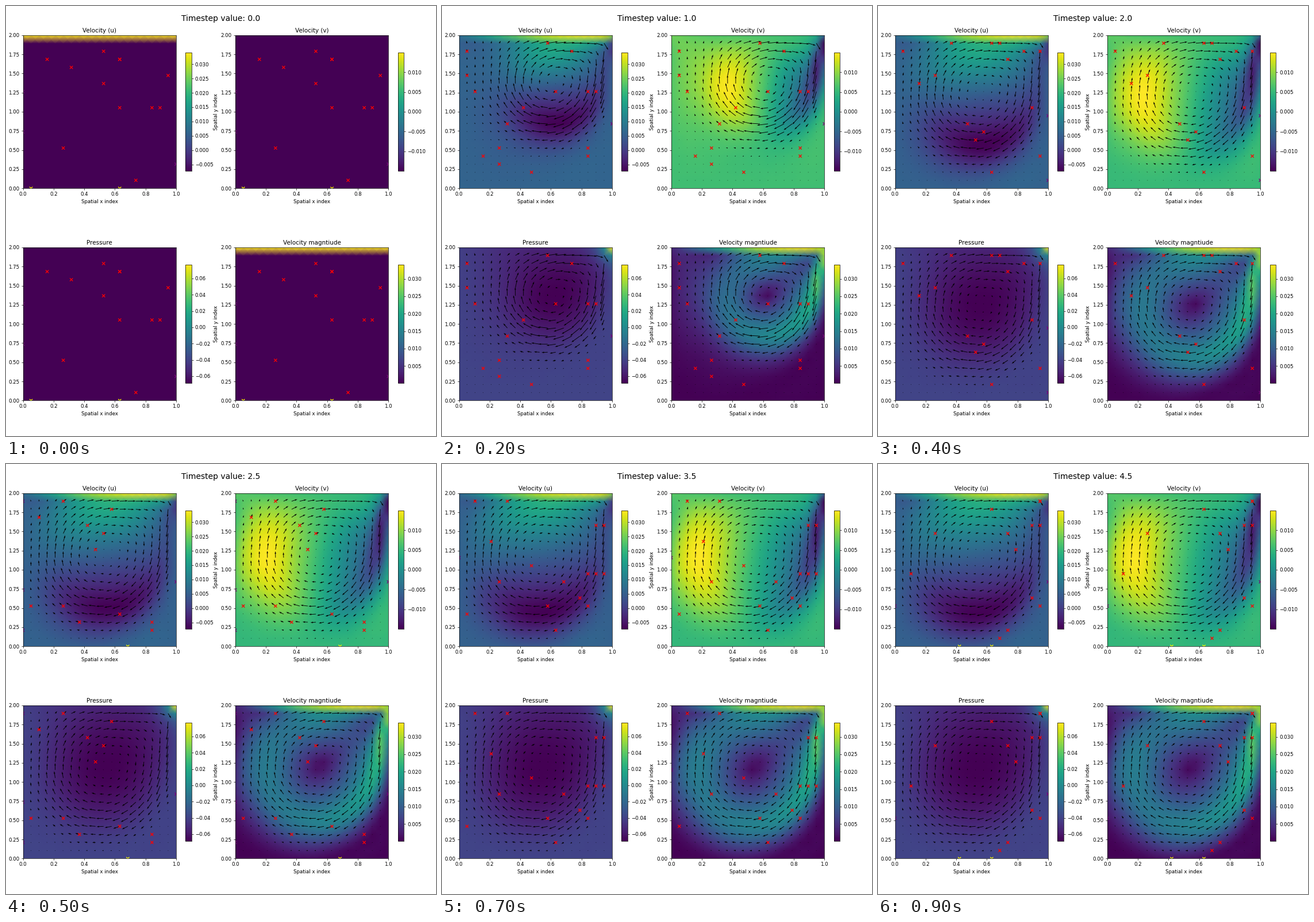
Animation, 748 px wide and 748 px high, one loop 1000 ms. Source, as a matplotlib script:

```python
import numpy as np
import matplotlib.pyplot as plt
from matplotlib.animation import FuncAnimation
from matplotlib.cm import ScalarMappable
from matplotlib.colors import Normalize
from matplotlib.ticker import MultipleLocator

STAGE = 748
FRAMES, INTERVAL = 10, 100
CELLS = 20          # displayed points per side
FINE = 2 * CELLS    # solver intervals per side
REYNOLDS = 1000
DT, STEPS = 0.02, 350     # solver step, steps between frames
MARKERS = 17

h = 1 / FINE
modes = np.arange(1, FINE)
SINES = np.sin(np.pi * np.outer(modes, modes) / FINE) * np.sqrt(2 / FINE)
eigen = (2 - 2 * np.cos(np.pi * modes / FINE)) / h**2
EIGEN = eigen[:, None] + eigen


def stream(vorticity):
    """Solve the Poisson equation for the stream function with sine modes."""
    psi = np.zeros((FINE + 1, FINE + 1))
    psi[1:-1, 1:-1] = SINES @ (SINES @ vorticity @ SINES / EIGEN) @ SINES
    return psi


def gradient(f):
    fx = (f[1:-1, 2:] - f[1:-1, :-2]) / (2 * h)
    fy = (f[2:, 1:-1] - f[:-2, 1:-1]) / (2 * h)
    return fx, fy


def rate(vorticity):
    """Vorticity transport in a square cavity with a moving lid."""
    psi = stream(vorticity)
    w = np.zeros_like(psi)
    w[1:-1, 1:-1] = vorticity
    w[:, 0] = -2 * psi[:, 1] / h**2
    w[:, -1] = -2 * psi[:, -2] / h**2
    w[0] = -2 * psi[1] / h**2
    w[-1] = -2 * psi[-2] / h**2 - 2 / h
    psi_x, psi_y = gradient(psi)
    w_x, w_y = gradient(w)
    laplacian = (w[2:, 1:-1] + w[:-2, 1:-1] + w[1:-1, 2:] + w[1:-1, :-2]
                 - 4 * vorticity) / h**2
    return psi_x * w_y - psi_y * w_x + laplacian / REYNOLDS


def advance(w):
    for _ in range(STEPS):
        a = rate(w)
        b = rate(w + DT / 2 * a)
        c = rate(w + DT / 2 * b)
        d = rate(w + DT * c)
        w = w + DT / 6 * (a + 2 * b + 2 * c + d)
    return w


unit = np.linspace(0, 1, CELLS)
X, Y = np.meshgrid(unit, unit)


def pressure(psi):
    """Low core in the vortex, sharp peak in the upper right corner."""
    core = np.abs(psi) / np.abs(psi).max()
    base = 0.2 - 0.07 * Y**2 * np.exp(-((X - 0.55) / 0.4)**2)
    corner = np.exp(-np.hypot(1 - X, 1 - Y) / 0.055)
    return base * (1 - core) + 0.85 * corner


def simulate():
    still = np.zeros((CELLS, CELLS))
    lid = still.copy()
    lid[-1] = 1
    fields = [(lid, still, still, lid)]
    w = np.zeros((FINE - 1, FINE - 1))
    for _ in range(FRAMES - 1):
        w = advance(w)
        psi = stream(w)
        psi_x, psi_y = gradient(psi)
        u, v = psi_y[::2, ::2], -psi_x[::2, ::2]
        fields.append((u, v, pressure(psi[1::2, 1::2]), np.hypot(u, v)))
    return fields


def sample_points(frame):
    """Random grid points below the lid, new in every frame."""
    rng = np.random.default_rng(frame)
    return (rng.integers(0, CELLS, MARKERS),
            rng.integers(0, CELLS - 1, MARKERS))


def marker_color(col, row):
    if row == 0:
        return "yellow"
    return "purple" if col in (0, CELLS - 1) else "red"


def place(fig, left, top, width, height):
    return fig.add_axes([left / STAGE, 1 - (top + height) / STAGE,
                         width / STAGE, height / STAGE])


FIELDS = simulate()
fig = plt.figure(figsize=(12, 12), dpi=STAGE / 12, facecolor="white")
heading = fig.suptitle("", fontsize=16, x=0.5, y=0.98)

SIDE, PITCH = 266.5, 369.2
# title, colour bar minimum, maximum, tick step
PANELS = [
    ("Velocity (u)", -0.0072, 0.0340, 0.005),
    ("Velocity (v)", -0.01497, 0.01497, 0.005),
    ("Pressure", -0.0685, 0.0766, 0.02),
    ("Velocity magntiude", 0.0001, 0.0340, 0.005),
]
inner = np.s_[1:-1, 1:-1]
panels = []
for index, (title, low, high, step) in enumerate(PANELS):
    row, col = divmod(index, 2)
    left, top = 29.5 + PITCH * col, 50.7 + PITCH * row
    ax = place(fig, left, top, SIDE, SIDE)
    mesh = ax.pcolormesh(X, 2 * Y, np.zeros_like(X), shading="gouraud",
                         cmap="viridis")
    arrows = ax.quiver(X[inner], 2 * Y[inner], X[inner], Y[inner],
                       scale=10, width=0.06 / (CELLS - 2))
    marks = ax.scatter([0], [0], marker="x", s=36, c="red")
    ax.set(xlim=(0, 1), ylim=(0, 2), title=title,
           xlabel="Spatial x index", ylabel="Spatial y index",
           xticks=np.arange(0, 1.1, 0.2), yticks=np.arange(0, 2.1, 0.25))
    bar = place(fig, left + 282.9, top + 30.5, 10.4, 205.5)
    fig.colorbar(ScalarMappable(Normalize(low, high), "viridis"), cax=bar,
                 ticks=MultipleLocator(step))
    panels.append((mesh, arrows, marks))


def update(frame):
    heading.set_text(f"Timestep value: {frame * 0.5:.1f}")
    u, v, _, speed = FIELDS[frame]
    cols, rows = sample_points(frame)
    spots = np.column_stack([cols, 2 * rows]) / (CELLS - 1)
    colors = [marker_color(c, r) for c, r in zip(cols, rows)]
    for (mesh, arrows, marks), field in zip(panels, FIELDS[frame]):
        mesh.set_array(field)
        mesh.set_clim(field.min(), field.max())
        arrows.set_visible(frame > 0)
        if frame > 0:
            arrows.scale = 1.8 * (CELLS - 2) * speed[inner].mean()
            arrows.set_UVC(u[inner], v[inner])
        marks.set_offsets(spots)
        marks.set_edgecolor(colors)
    return []


anim = FuncAnimation(fig, update, frames=FRAMES, interval=INTERVAL,
                     init_func=lambda: update(0), repeat=True, repeat_delay=0,
                     blit=False)
plt.show()
```
